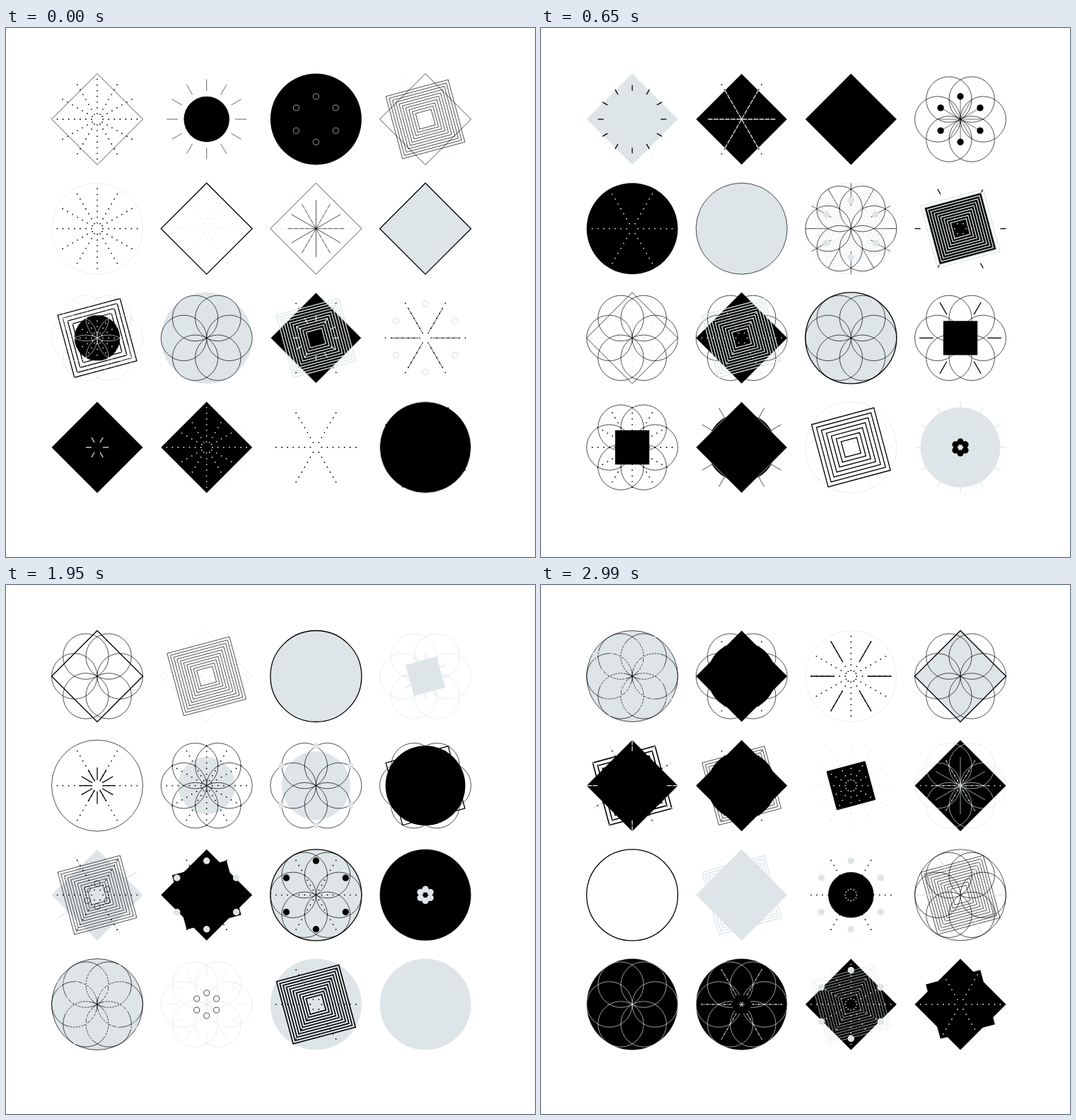
Write an HTML page with a canvas that moves like this. It is 748 px wide and 748 px high and loops after 3.25 s.

```html
<!DOCTYPE html>
<html lang="en">
<head>
<meta charset="utf-8">
<title>Geometric glyphs</title>
<style>
html, body { margin: 0; width: 100%; height: 100%; overflow: hidden; background: #fff; }
canvas { display: block; width: 748px; height: 748px; }
</style>
</head>
<body>
<canvas id="c" width="748" height="748"></canvas>
<script>
const g = document.getElementById('c').getContext('2d');
const K = '#000', L = '#dee5e8';
const THIN = 0.7, MID = 1.3, BOLD = 1.6;
const U = 8.06, STEP = 154.67, FIRST = 129, HOLD = 650;
const TAU = Math.PI * 2, TILT = Math.PI / 6;

// All radii are in units of U; a glyph is 8 units in radius.
const fill = c => { g.fillStyle = c; g.fill(); };
const stroke = (c, w) => { g.strokeStyle = c; g.lineWidth = w; g.stroke(); };
const around = (n, a0, f) => {
  for (let i = 0; i < n; i++) {
    const a = a0 + i * TAU / n;
    f(Math.cos(a) * U, Math.sin(a) * U);
  }
};
const circle = (r, x = 0, y = 0) => { g.beginPath(); g.arc(x, y, r * U, 0, TAU); };
const quad = (r, a0) => {
  g.beginPath();
  around(4, a0, (x, y) => g.lineTo(x * r, y * r));
  g.closePath();
};

const disc = (c, r = 8) => { circle(r); fill(c); };
const ring = (c, w = THIN) => { circle(8); stroke(c, w); };
const gem = c => { quad(8, 0); fill(c); };
const gemLine = (c, w = THIN) => { quad(8, 0); stroke(c, w); };
const tile = (c, r) => { quad(r, TILT); fill(c); };
const block = c => { quad(3 * Math.SQRT2, TAU / 8); fill(c); };
const nest = (c, w = THIN, n = 10) => {
  for (let i = 0; i < n; i++) { quad(8 - 6 * i / (n - 1), TILT); stroke(c, w); }
};
const flower = (c, w = THIN) => around(6, 0, (x, y) => { circle(4, 4 * x, 4 * y); stroke(c, w); });
const dots = (n, c, last = 7) => around(n, 0, (x, y) => {
  for (let k = 1; k <= last; k++) { circle(0.11, k * x, k * y); fill(c); }
});
const rays = (n, a, b, c, w = THIN) => around(n, 0, (x, y) => {
  g.beginPath();
  g.moveTo(a * x, a * y);
  g.lineTo(b * x, b * y);
  stroke(c, w);
});
const beads = (d, c, r = 0.58) => around(6, TILT, (x, y) => { circle(r, d * x, d * y); fill(c); });
const loops = (d, c, w = THIN, r = 0.5) => around(6, TILT, (x, y) => { circle(r, d * x, d * y); stroke(c, w); });

const scenes = [
  [
    () => { dots(12, K); gemLine(K); },
    () => { disc(K, 4); rays(12, 5, 7, K, 0.6); },
    () => { disc(K); loops(4, L); },
    () => { dots(6, L, 8); nest(K); gemLine(K); },

    () => { ring(L); dots(12, K); },
    () => { dots(6, L); gemLine(K, MID); },
    () => { gemLine(K); rays(12, 0, 5, K); dots(6, L); },
    () => { gem(L); gemLine(K, MID); },

    () => { nest(K, MID, 7); disc(K, 4); flower(L); dots(12, L); },
    () => { disc(L); flower(K); },
    () => { dots(6, K); gem(K); gemLine(L, MID); nest(L, MID); rays(12, 3, 4, L, MID); },
    () => { rays(6, 1.2, 6, K); dots(6, K); loops(6, L, MID); },

    () => { gem(K); rays(6, 1, 2, L, MID); },
    () => { gem(K); dots(12, L); },
    () => dots(6, K),
    () => { disc(K); ring(L); nest(K, BOLD, 7); }
  ],
  [
    () => { dots(12, L); gem(L); rays(12, 5, 6, K, MID); },
    () => { gem(K); gemLine(L); rays(6, 0, 6, L, MID); dots(6, K); },
    () => gem(K),
    () => { flower(K); rays(12, 0, 4, K, 0.6); beads(4, K); },

    () => { disc(K); dots(6, L); },
    () => { disc(L); ring(K); },
    () => { rays(12, 4, 8, K); nest(L); ring(L); flower(K); beads(5, L); },
    () => { rays(6, 7, 8, K, MID); tile(K, 7.3); nest(L, MID); dots(6, L, 2); },

    () => { dots(12, L); flower(K); gemLine(K); },
    () => { flower(K); gem(K); nest(L, MID); dots(6, L); },
    () => { disc(L); ring(K, MID); flower(K); },
    () => { flower(K); rays(6, 4.75, 7.2, K, MID); block(K); },

    () => { flower(K); dots(12, K); block(K); },
    () => { rays(12, 5, 8, K); disc(K, 6); gem(K); gemLine(L); },
    () => { ring(L); dots(6, L); nest(K, MID, 7); },
    () => { disc(L, 7); rays(12, 7, 8, L, MID); beads(1, K); }
  ],
  [
    () => { nest(K); dots(6, K); gem(K); },
    () => { ring(L, MID); rays(6, 5, 8, L); loops(2, K, MID); nest(L, MID); },
    () => { gemLine(L); flower(K); },
    () => { dots(12, K); tile(K, 5); },

    () => { gemLine(L); dots(6, K); loops(4, K, MID, 2); },
    () => { gem(L); flower(L); nest(K); },
    () => { ring(L); dots(6, L); },
    () => { flower(K); nest(K); gemLine(K, MID); rays(6, 3, 8, K, MID); },

    () => { gem(K); gemLine(L); rays(12, 1, 8, L, MID); },
    () => { disc(L); ring(K); dots(12, K); },
    () => { ring(K, MID); rays(12, 4, 6, L); dots(12, L); },
    () => { disc(L); ring(K); dots(12, K); nest(K, MID, 7); beads(2, K); },

    () => { ring(L, MID); dots(12, K); rays(6, 5, 6, K, MID); },
    () => { flower(L); rays(12, 4.75, 7.2, K, MID); nest(L, MID); },
    () => { gem(K); flower(L); rays(12, 0, 7, L, 0.5); },
    () => { gem(L); rays(6, 6, 7, L); flower(K); }
  ],
  [
    () => { flower(K); gemLine(K, MID); },
    () => { gemLine(L); dots(6, L); nest(K); },
    () => { disc(L); ring(K, MID); },
    () => { flower(L); tile(L, 4); rays(12, 2, 4, L, MID); },

    () => { ring(K); dots(6, K); rays(12, 1, 3.2, K, MID); },
    () => { disc(L, 5); flower(K); dots(12, K); },
    () => { disc(L, 6); flower(K); beads(7, L, 0.5); },
    () => { flower(K); nest(K, MID, 7); disc(K, 7); },

    () => { rays(12, 6, 8, L, MID); gem(L); nest(K); loops(2, K); dots(6, K); },
    () => { dots(6, K); gem(K); tile(K, 7); beads(6, L); },
    () => { disc(L); ring(K, MID); flower(K); dots(6, K); beads(6, K); },
    () => { disc(K); beads(1, L); },

    () => { disc(L); ring(K); flower(K); nest(L, MID); },
    () => { flower(L); rays(12, 5, 7, L); loops(2, K); },
    () => { disc(L); nest(K, BOLD); dots(6, K); },
    () => disc(L)
  ],
  [
    () => { disc(L); ring(K); flower(K); nest(L, MID); },
    () => { flower(K); dots(6, K); disc(K, 6); gem(K); },
    () => { ring(L); dots(12, K); rays(6, 3, 7, K, MID); },
    () => { dots(12, L); gem(L); gemLine(K, MID); flower(K); },

    () => { nest(K, BOLD, 7); gem(K); rays(12, 6, 8, L, MID); dots(12, K); },
    () => { nest(K); dots(6, K); disc(K, 6); gem(K); },
    () => { tile(K, 5); dots(12, L); },
    () => { gem(K); flower(L); rays(12, 0, 5, L); dots(6, L); },

    () => ring(K, MID),
    () => { dots(6, L); nest(L, MID); gem(L); },
    () => { dots(6, K); disc(K, 4); dots(12, L, 1); beads(6, L); },
    () => { nest(K); rays(6, 4, 8, L, MID); ring(K); flower(K); },

    () => { disc(K); flower(L); },
    () => { disc(K); flower(L); rays(6, 2, 7, L); dots(6, L); disc(K, 1.6); rays(6, 0, 0.5, L, 1); },
    () => { gem(K); nest(L); dots(12, L); beads(6, L); },
    () => { gem(K); tile(K, 7); dots(6, L); }
  ]
];

const draw = glyphs => {
  g.setTransform(1, 0, 0, 1, 0, 0);
  g.fillStyle = '#fff';
  g.fillRect(0, 0, 748, 748);
  glyphs.forEach((glyph, i) => {
    g.setTransform(1, 0, 0, 1, FIRST + STEP * (i % 4), FIRST + STEP * Math.floor(i / 4));
    glyph();
  });
};

let shown = -1;
const start = performance.now();
const tick = () => {
  const i = Math.floor((performance.now() - start) / HOLD) % scenes.length;
  if (i !== shown) draw(scenes[shown = i]);
  requestAnimationFrame(tick);
};
tick();
</script>
</body>
</html>
```
